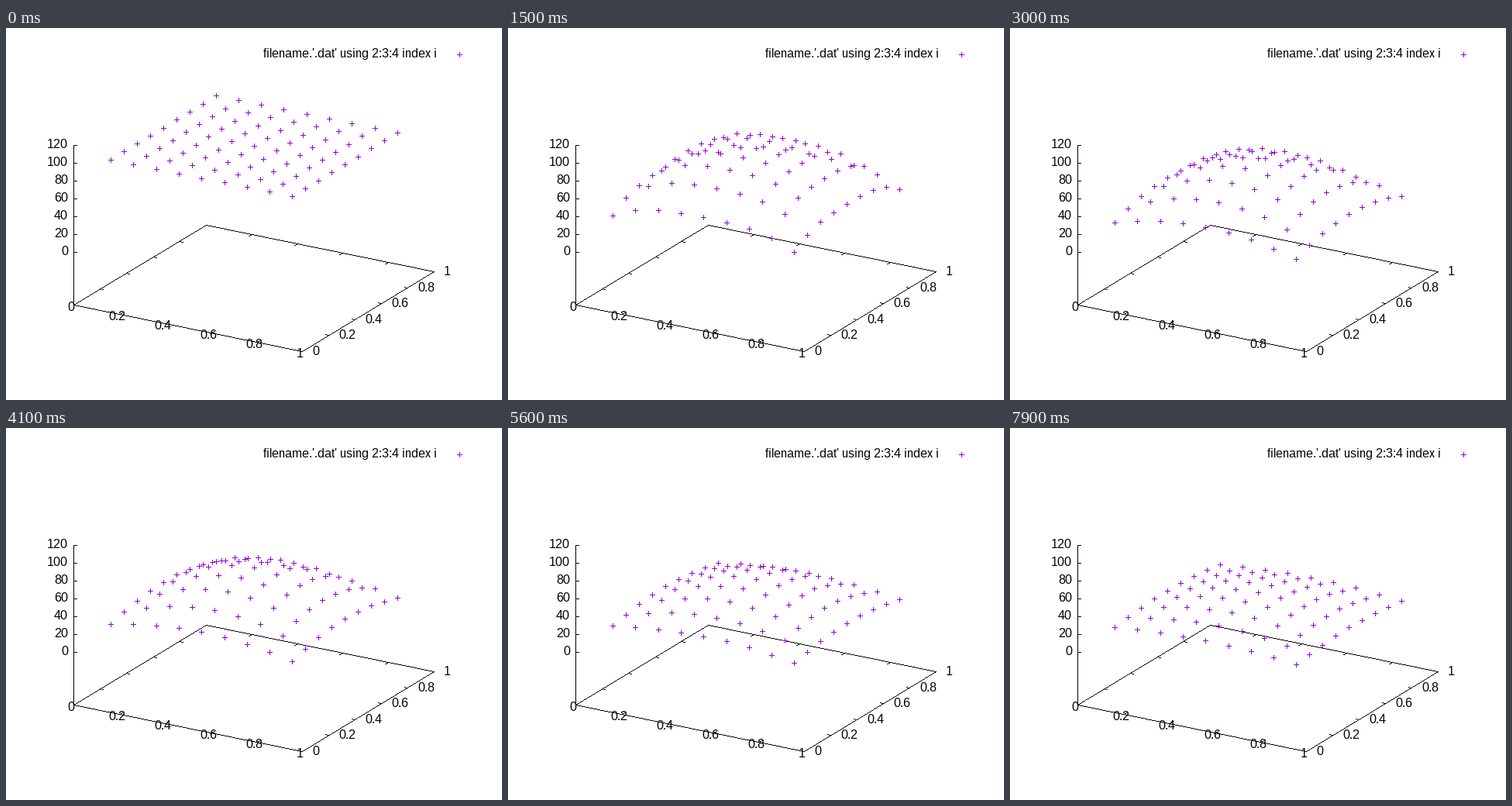
Animation of 640 by 480 pixels, one loop 8 s. Source, as a matplotlib script:

```python
import numpy as np
import matplotlib.pyplot as plt
from matplotlib.animation import FuncAnimation
from matplotlib.collections import LineCollection

W, H, DPI = 640, 480, 80
PX = 72 / DPI            # points per pixel
FRAMES, STEP_MS = 80, 100
PURPLE = "#9400d3"

plt.rcParams["font.family"] = "Liberation Sans"
plt.rcParams["font.size"] = 16 * PX
plt.rcParams["text.hinting"] = "default"
plt.rcParams["text.hinting_factor"] = 1   # whole-pixel letter spacing

fig = plt.figure(figsize=(W / DPI, H / DPI), dpi=DPI, facecolor="white")
ax = fig.add_axes([0, 0, 1, 1])
ax.set_xlim(0, W)
ax.set_ylim(H, 0)
ax.axis("off")


def whole(v):
    return np.floor(np.asarray(v) + .5)


def pixel_line(start, end):
    """Hard-edged line as a run of single pixels."""
    a, b = whole(start), whole(end)
    n = int(np.abs(b - a).max()) + 1
    x, y = whole(np.linspace(a, b, n)).T
    return np.stack([x, y + .5, x + 1, y + .5], axis=1).reshape(-1, 2, 2)


def crosses(x, y):
    """Segments of 7 px plus signs at whole pixels."""
    x, y = whole(x).ravel(), whole(y).ravel()
    flat = np.stack([x - 3, y + .5, x + 4, y + .5], axis=1)
    tall = np.stack([x + .5, y - 3, x + .5, y + 4], axis=1)
    return np.concatenate([flat, tall]).reshape(-1, 2, 2)


def pixel_layer(segments, color, zorder):
    layer = LineCollection(segments, colors=color, linewidths=PX,
                           antialiaseds=False, zorder=zorder)
    layer.set_snap(False)
    return ax.add_collection(layer)


def label(x, base, text, ha):
    ax.text(x, whole(base), text, ha=ha, va="baseline", color="black")


# Box: base outline, z axis and tics
left, front, right, back = map(np.array, [(87, 357), (382, 417), (552, 314), (258, 254)])
lines = [(left, front), (front, right), (right, back), (back, left),
         ((87, 151), (87, 357))]

for k in range(7):
    y = 289 - 23 * k
    lines.append(((87, y), (91, y)))
    label(80, y + 4, str(20 * k), "right")

for k in range(6):
    t = k / 5
    text = f"{t:g}"
    px, qx = left + t * (front - left), back + t * (right - back)
    py, qy = front + t * (right - front), left + t * (back - left)
    label(px[0] - 3, px[1] + 8, text, "center")
    label(py[0] + 13, py[1] + 5, text, "left")
    if 0 < k < 5:
        lines += [(px, px + (4, -2)), (qx, qx + (-4, 2)),
                  (py, py + (-4, -1)), (qy, qy + (4, 1))]

pixel_layer(np.concatenate([pixel_line(*ab) for ab in lines]), "black", 2)

# Key
label(555.5, 38, "filename.'.dat' using 2:3:4 index i", "right")
pixel_layer(crosses(585, 34), PURPLE, 3)

# Cooling plate: implicit heat steps on the 9 x 9 inner nodes
N, R = 9, 0.1
grid = np.arange(1, N + 1) / (N + 1)
gx, gy = np.meshgrid(grid, grid, indexing="ij")
wall = 21 - gy
eye = np.eye(N)
second = 2 * eye - np.eye(N, k=1) - np.eye(N, k=-1)
step = np.linalg.inv(np.eye(N * N) + R * (np.kron(second, eye) + np.kron(eye, second)))

excess = (100 - wall).ravel()
heat = []
for _ in range(FRAMES):
    heat.append(wall + excess.reshape(N, N))
    excess = step @ excess

# Oblique view: screen vectors of the x, y and z axes
X_AXIS, Y_AXIS, Z_UNIT = (292.8, 59.5), (169.2, -103.12), 1.144
u, v = gx - .5, gy - .5
sx = 320 + X_AXIS[0] * u + Y_AXIS[0] * v
sy = 152.3 + X_AXIS[1] * u + Y_AXIS[1] * v

points = pixel_layer([], PURPLE, 3)


def draw(i):
    points.set_segments(crosses(sx, sy + (100 - heat[i]) * Z_UNIT))
    return points,


anim = FuncAnimation(fig, draw, frames=FRAMES, interval=STEP_MS,
                     repeat=True, repeat_delay=0, blit=False)
plt.show()
```
